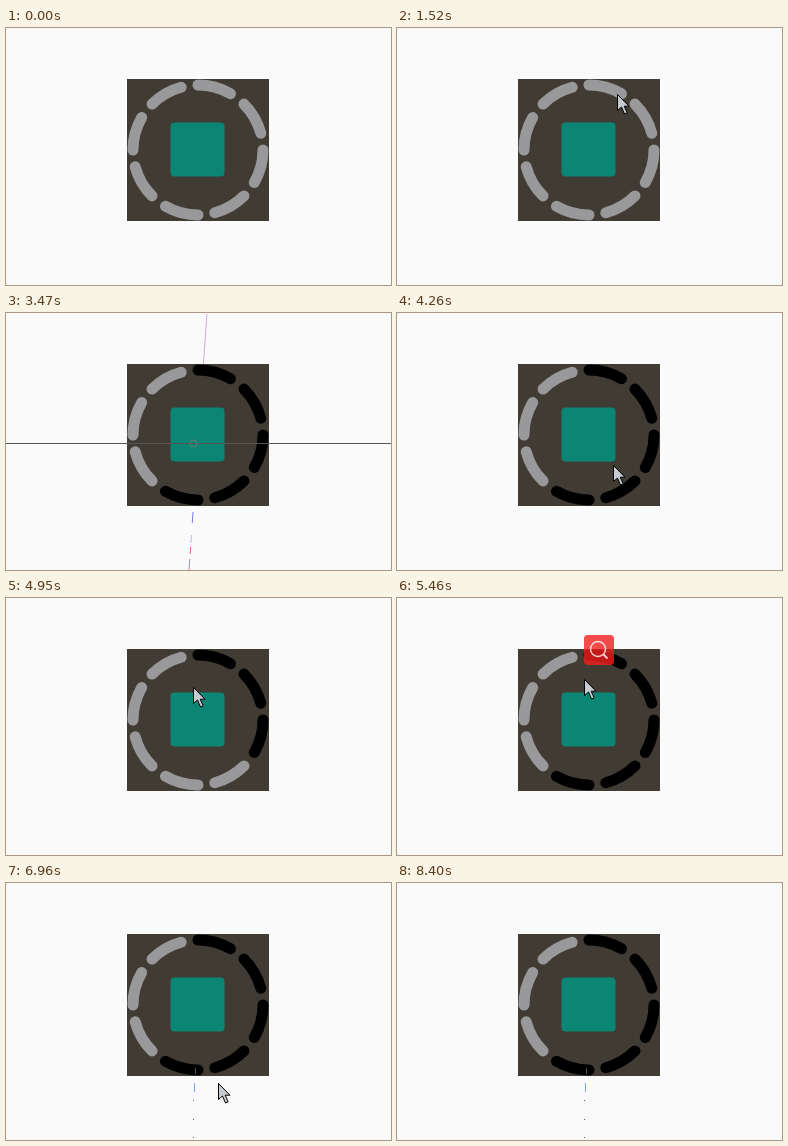
Recreate the animation shown at these times as an HTML page with a canvas. Size 385 by 257 pixels, loop 8.5 s.

```html
<!DOCTYPE html>
<html lang="en">
<head>
<meta charset="utf-8">
<title>Segmented dial</title>
<style>
  html, body { margin: 0; width: 100%; height: 100%; overflow: hidden; background: #fafafa; }
  canvas { display: block; }
</style>
</head>
<body>
<canvas id="stage" width="385" height="257"></canvas>
<script>
const ctx = document.getElementById('stage').getContext('2d');
const LOOP = 8500;

// Each step changes part of the scene; guide and cross last for one step only.
const steps = [
  [0, { level: 0, cursor: null, icon: null, traces: false, beam: false }],
  [740, { cursor: [244, 170] }],
  [860, { cursor: [244, 124] }],
  [1010, { cursor: [236, 92] }],
  [1130, { cursor: [224, 63] }],
  [1400, { cursor: [222, 65] }],
  [1520, { cursor: [220, 66] }],
  [1830, { level: 1 }],
  [2270, { cursor: [218, 64] }],
  [2390, { level: 2 }],
  [2510, { cursor: [217, 73] }],
  [2650, { guide: [219, 214] }],
  [2780, { level: 3, cursor: [187, 73], icon: [217, 28, 0.85] }],
  [2930, { cursor: null, icon: null, guide: [201, 183] }],
  [3080, { level: 4 }],
  [3230, { guide: [201, 183], cross: 160 }],
  [3350, { level: 5 }],
  [3470, { guide: [201, 183], cross: 130 }],
  [3590, { level: 6, cursor: [214, 80] }],
  [3740, { cursor: [214, 98] }],
  [3860, { cursor: [215, 128] }],
  [3990, { cursor: [216, 152] }],
  [4130, { guide: [219, 213] }],
  [4260, { level: 5 }],
  [4410, { guide: [219, 213] }],
  [4540, { level: 4 }],
  [4680, { level: 3 }],
  [4800, { cursor: [187, 91] }],
  [4950, { cursor: [187, 89] }],
  [5100, { guide: [201, 185] }],
  [5220, { level: 4 }],
  [5340, { guide: [201, 185] }],
  [5460, { level: 5, cursor: [187, 81], icon: [187, 37, 0.8] }],
  [5610, { cursor: null, icon: null, guide: [201, 185] }],
  [5730, { level: 6 }],
  [6030, { guide: [201, 185], cross: 217 }],
  [6150, { level: 5, traces: true }],
  [6300, { cursor: [201, 229] }],
  [6420, { cursor: [196, 210] }],
  [6540, { cursor: [190, 188] }],
  [6660, { cursor: [183, 168] }],
  [6810, { cursor: [228, 183] }],
  [6960, { cursor: [212, 200] }],
  [7080, { cursor: null, beam: true }],
  [7360, { beam: false }],
  [7760, { icon: [188, 218, 0.4] }],
  [8030, { icon: [188, 218, 0.8] }],
  [8400, { icon: null }]
];

function sceneAt(time) {
  const scene = {};
  for (const [start, change] of steps) {
    if (start > time) break;
    Object.assign(scene, { guide: null, cross: null }, change);
  }
  return scene;
}

function line(x1, y1, x2, y2, color, width = 1) {
  ctx.strokeStyle = color;
  ctx.lineWidth = width;
  ctx.beginPath();
  ctx.moveTo(x1, y1);
  ctx.lineTo(x2, y2);
  ctx.stroke();
}

function box(x, y, w, h, radius, color) {
  ctx.fillStyle = color;
  ctx.beginPath();
  ctx.roundRect(x, y, w, h, radius);
  ctx.fill();
}

function drawDial(level) {
  box(121, 51, 142, 142, 0, '#403b33');
  ctx.lineWidth = 11;
  ctx.lineCap = 'round';
  for (let i = 0; i < 8; i++) {
    const start = -Math.PI / 2 + i * Math.PI / 4;
    ctx.strokeStyle = i < level ? '#000' : '#99989a';
    ctx.beginPath();
    ctx.arc(192, 122, 65, start, start + Math.PI / 6);
    ctx.stroke();
  }
  ctx.lineCap = 'butt';
  box(164.5, 94.5, 54, 54, 4, '#0b8674');
}

function drawGuide([top, bottom]) {
  const x = y => top + (bottom - top) * y / 257;
  const part = (y1, y2, color) => line(x(y1), y1, x(y2), y2, color);
  part(1, 51, '#d3a9dd');
  part(199, 210, '#7a7ae6');
  part(222, 230, '#c8b4ee');
  part(234, 241, '#ee5a96');
  part(246, 257, '#ec6ca6');
}

function drawCross(y) {
  line(0, y + 0.5, 385, y + 0.5, '#555');
  ctx.strokeStyle = '#777';
  ctx.beginPath();
  ctx.arc(187.5, y + 0.5, 3.5, 0, 2 * Math.PI);
  ctx.stroke();
}

function drawTraces() {
  line(189.5, 185, 189.5, 191, '#55554f');
  line(188.5, 200, 188.5, 209, '#6fa4ee');
  for (const y of [217, 236, 254]) box(187, y, 1, 1, 0, '#555');
}

function drawIcon([x, y, alpha]) {
  ctx.save();
  ctx.translate(x, y);
  ctx.globalAlpha = alpha;
  box(0, 0, 30, 30, 4, '#f21e1e');
  ctx.strokeStyle = '#fff';
  ctx.lineWidth = 1.5;
  ctx.beginPath();
  ctx.arc(14, 14, 7.5, 0, 2 * Math.PI);
  ctx.stroke();
  line(19.5, 19.5, 23.5, 23.5, '#fff', 1.8);
  ctx.restore();
}

const arrow = new Path2D('M0 0V16L4 12.5L7 19.5L9.7 18.3L6.7 11.7H11.5Z');

function drawCursor([x, y]) {
  ctx.save();
  ctx.translate(x + 0.5, y + 0.5);
  ctx.fillStyle = '#c6cbd1';
  ctx.strokeStyle = '#000';
  ctx.lineWidth = 1;
  ctx.fill(arrow);
  ctx.stroke(arrow);
  ctx.restore();
}

function draw(time) {
  const scene = sceneAt(time);
  box(0, 0, 385, 257, 0, '#fafafa');
  drawDial(scene.level);
  if (scene.traces) drawTraces();
  if (scene.guide) drawGuide(scene.guide);
  if (scene.cross) drawCross(scene.cross);
  if (scene.icon) drawIcon(scene.icon);
  if (scene.cursor) drawCursor(scene.cursor);
  if (scene.beam) line(196.5, 227, 196.5, 236, '#777');
}

const began = performance.now();
function tick() {
  draw((performance.now() - began) % LOOP);
  requestAnimationFrame(tick);
}
tick();
</script>
</body>
</html>
```
